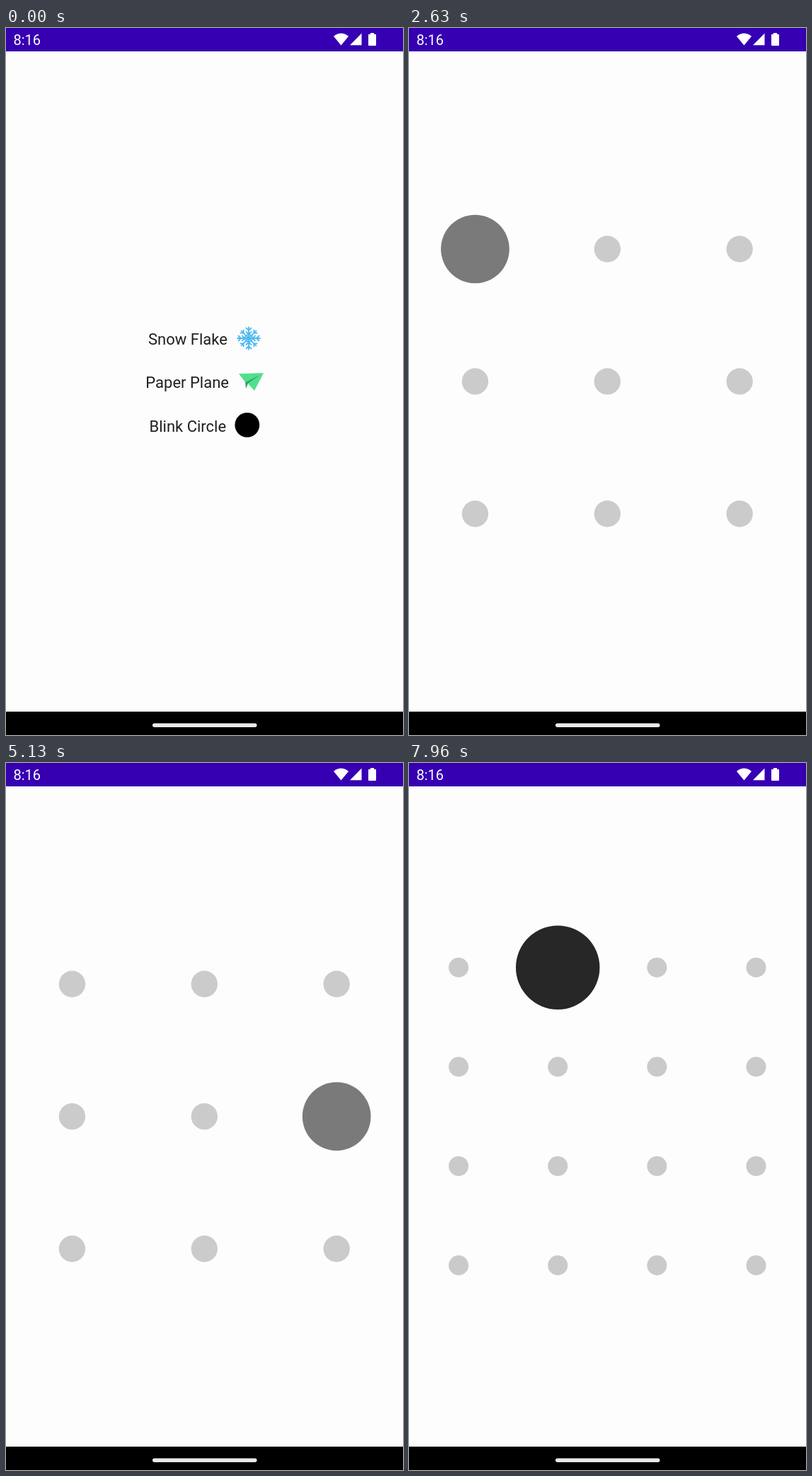
Animation of 561x998 px, one loop 8 s. Source, as an HTML page:

```html
<!DOCTYPE html>
<html lang="en">
<head>
<meta charset="utf-8">
<title>Blink circle</title>
<style>
  html, body { margin: 0; width: 100%; height: 100%; overflow: hidden; background: #fdfdfd; }
  svg { display: block; width: 100%; height: 100%; }
  text { font-family: Roboto, sans-serif; font-size: 22px; fill: #1f1f1f; }
  .clock { font-size: 20px; fill: #fff; }
</style>
</head>
<body>
<svg viewBox="0 0 561 998">
  <defs>
    <path id="arm" d="M0 0V-16.5M-4 -15L0 -11L4 -15M-4 -9.5L0 -5.5L4 -9.5"/>
    <path id="diag" d="M0 0V-15.5M-3.5 -14L0 -10.5L3.5 -14"/>
  </defs>
  <rect width="561" height="998" fill="#fdfdfd"/>

  <g id="menu">
    <text x="201" y="447">Snow Flake</text>
    <text x="197.3" y="508">Paper Plane</text>
    <text x="202.5" y="569.5">Blink Circle</text>
    <g id="flake" transform="translate(343 438)" fill="none" stroke="#4db8f0" stroke-width="1.8">
      <circle r="5"/>
    </g>
    <path d="M329 488L364 487L338 500Z" fill="#4fe08d"/>
    <path d="M338 500L364 487L342 502L339 509Z" fill="#2ba866"/>
    <path d="M342 502L364 487L351 512Z" fill="#4fe08d"/>
    <circle cx="340.8" cy="560.4" r="17.4"/>
  </g>

  <g id="dots"></g>

  <rect width="561" height="33" fill="#3600b2"/>
  <text class="clock" x="10.5" y="24">8:16</text>
  <g fill="#fff">
    <path d="M463 11.8Q473.5 3.4 484 11.8L473.5 24.6Z"/>
    <path d="M486 24.3H502.5V7.6Z"/>
    <path d="M515 7H520V8.8H522Q523 8.8 523 9.8V24Q523 25 522 25H513Q512 25 512 24V9.8Q512 8.8 513 8.8H515Z"/>
  </g>
  <rect y="965" width="561" height="33"/>
  <rect x="207" y="981.5" width="147.5" height="5.5" rx="2.75" fill="#e9e9e9"/>
</svg>
<script>
  const NS = 'http://www.w3.org/2000/svg';
  const LOOP = 8000, STEP = 500, RAMP = 300, LOW = 0.2;
  const WIDTH = 560.6, MID_Y = 498.9;
  const FADE_AT = 410, FADE = 300;

  const menu = document.getElementById('menu');
  const layer = document.getElementById('dots');
  const clamp = v => Math.min(1, Math.max(0, v));

  function add(parent, tag, attrs) {
    const el = document.createElementNS(NS, tag);
    for (const key in attrs) el.setAttribute(key, attrs[key]);
    return parent.appendChild(el);
  }

  function buildGrid(size, start) {
    const group = add(layer, 'g', {});
    const cell = WIDTH / size;
    const dots = Array.from({ length: size * size }, (_, i) => add(group, 'circle', {
      cx: (i % size + 0.5) * cell,
      cy: MID_Y - WIDTH / 2 + (Math.floor(i / size) + 0.5) * cell
    }));
    return { group, dots, start, radius: cell / 2 };
  }

  // Up for one ramp, back down for the next.
  const pulse = t => LOW + (1 - LOW) * clamp(1 - Math.abs(t - RAMP) / RAMP);

  const flake = document.getElementById('flake');
  for (let i = 0; i < 8; i++) {
    add(flake, 'use', { href: i % 2 ? '#diag' : '#arm', transform: `rotate(${i * 45})` });
  }

  const grids = [buildGrid(2, 410), buildGrid(3, 2512), buildGrid(4, 7103)];

  function draw(t) {
    const fade = clamp((t - FADE_AT) / FADE);
    menu.setAttribute('opacity', 1 - fade);
    layer.setAttribute('opacity', fade);
    grids.forEach((grid, n) => {
      const end = n + 1 < grids.length ? grids[n + 1].start : LOOP;
      const shown = t >= grid.start && t < end;
      grid.group.setAttribute('display', shown ? 'inline' : 'none');
      if (!shown) return;
      grid.dots.forEach((dot, i) => {
        const level = pulse(t - grid.start - i * STEP);
        dot.setAttribute('r', grid.radius * level);
        dot.setAttribute('fill-opacity', level);
      });
    });
  }

  const origin = performance.now();
  function tick() {
    draw((performance.now() - origin) % LOOP);
    requestAnimationFrame(tick);
  }
  draw(0);
  requestAnimationFrame(tick);
</script>
</body>
</html>
```
